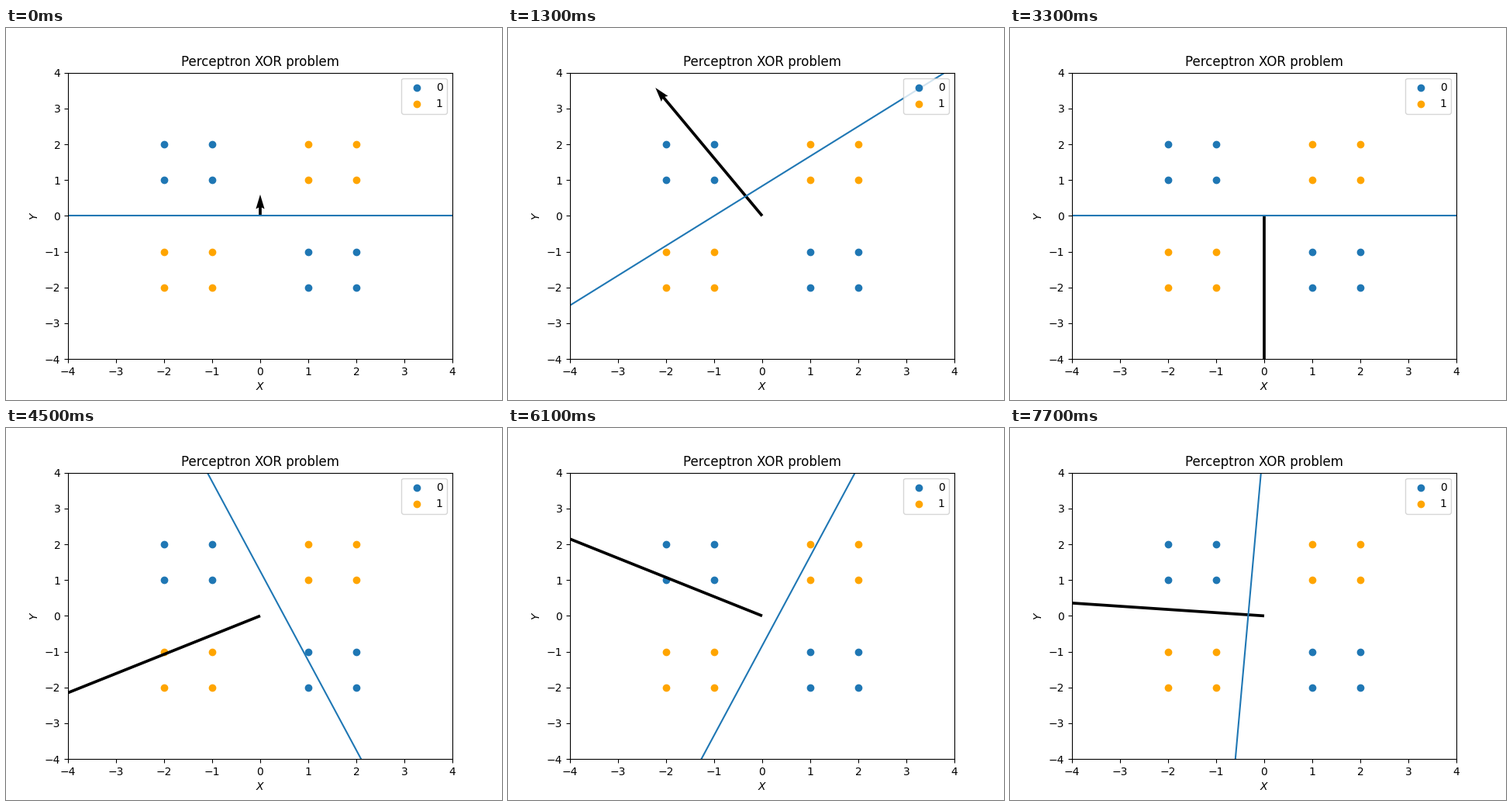
Write a matplotlib script that moves like this. It is 640 px wide and 480 px high and loops after 8 s.

```python
from itertools import product

import numpy as np
import matplotlib.pyplot as plt
from matplotlib.animation import FuncAnimation

FRAMES = 80
INTERVAL = 100
RATE = 5
LIMIT = 4


def make_samples():
    """List (x, y, class) clockwise by quadrant, from the upper left."""
    left, right = range(-2, 0), range(1, 3)
    up, down = range(1, 3), range(-1, -3, -1)
    # The first quadrant goes row by row, the others column by column.
    quadrants = [
        sorted(product(left, up), key=lambda point: -point[1]),
        product(right, up),
        product(right, down),
        product(left, down),
    ]
    return [(x, y, int(x * y > 0)) for points in quadrants for x, y in points]


def train(samples, steps):
    """Return the weights (wx, wy, bias) at the start and after each sample."""
    weights = np.array([0, 1, 0])
    history = [weights]
    for step in range(steps - 1):
        x, y, label = samples[step % len(samples)]
        inputs = np.array([x, y, 1])
        predicted = int(weights @ inputs > 0)
        weights = weights + RATE * (label - predicted) * inputs
        history.append(weights)
    return history


samples = make_samples()
history = train(samples, FRAMES)

fig, ax = plt.subplots(figsize=(6.4, 4.8), dpi=100)
for label, color in enumerate(("tab:blue", "orange")):
    xs, ys = zip(*[(x, y) for x, y, c in samples if c == label])
    ax.scatter(xs, ys, color=color, label=str(label))

edges = np.array([-LIMIT, LIMIT])
boundary, = ax.plot(edges, [0, 0], color="tab:blue")
arrow = ax.quiver([0], [0], [0], [1], scale=18)

ax.set(xlim=edges, ylim=edges, xlabel="$X$", ylabel="$Y$",
       title="Perceptron XOR problem")
ax.legend(loc="upper right")


def update(frame):
    wx, wy, bias = history[frame]
    boundary.set_ydata(-(wx * edges + bias) / wy)
    arrow.set_UVC([wx], [wy])
    return boundary, arrow


anim = FuncAnimation(fig, update, frames=FRAMES, interval=INTERVAL,
                     repeat=True, repeat_delay=0)
plt.show()
```
